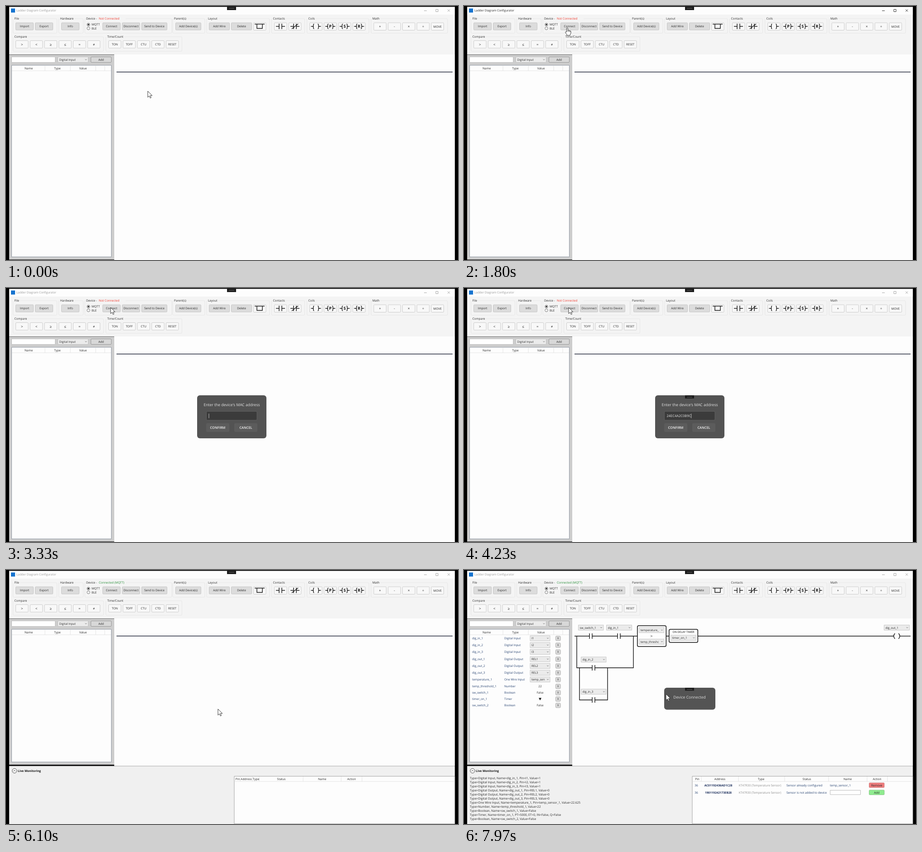
Recreate the animation shown at these times as an HTML page with a canvas. Size 998x561 px, loop 8000 ms.

```html
<!DOCTYPE html>
<html lang="en">
<head>
<meta charset="utf-8">
<title>Ladder Diagram Configurator</title>
<style>
html, body { margin: 0; width: 100%; height: 100%; overflow: hidden; background: #000; }
canvas { display: block; width: 998px; height: 561px; }
</style>
</head>
<body>
<canvas id="stage"></canvas>
<script>
const LOOP = 8000, W = 998, H = 561;
const canvas = document.getElementById('stage');
const ctx = canvas.getContext('2d');
const dpr = window.devicePixelRatio || 1;
canvas.width = W * dpr;
canvas.height = H * dpr;

const INK = '#262626', NAVY = '#24406f';
const T = { focus: 70, ble: 2330, mqtt: 2800, dialog: 3260, notch: 3400, type: 3430, hover: 5070,
            close: 5600, online: 6100, toast: 6130, data: 6630 };

// time, x, y of the pointer tip
const PATH = [
  [0, 313, 188], [30, 313, 188], [830, 229, 48], [1750, 229, 48], [2250, 194, 45], [2480, 194, 45],
  [2630, 198, 36], [2820, 193, 38], [3150, 231, 43], [4260, 231, 43], [5030, 468, 307],
  [6750, 468, 307], [7900, 446, 274], [8000, 446, 274]
];

function rect(x, y, w, h, fill, stroke, r = 0, lw = 1) {
  ctx.beginPath();
  ctx.roundRect(x, y, w, h, r);
  if (fill) { ctx.fillStyle = fill; ctx.fill(); }
  if (stroke) { ctx.strokeStyle = stroke; ctx.lineWidth = lw; ctx.stroke(); }
}

function line(points, color = '#111', lw = 1.4) {
  ctx.beginPath();
  for (let i = 0; i < points.length; i += 2) ctx.lineTo(points[i], points[i + 1]);
  ctx.strokeStyle = color;
  ctx.lineWidth = lw;
  ctx.stroke();
}

function text(s, x, y, { size = 6.5, color = INK, align = 'left', weight = 400 } = {}) {
  ctx.font = `${weight} ${size}px "Open Sans", "Noto Sans", sans-serif`;
  ctx.fillStyle = color;
  ctx.textAlign = align;
  ctx.textBaseline = 'alphabetic';
  ctx.fillText(s, x, y + size * 0.36);
}

const mid = (s, x, y, o = {}) => text(s, x, y, { ...o, align: 'center' });

function button(s, x, y, w, h, fill = '#dcdcdc', border = '#bdbdbd', size = 6.5) {
  rect(x + .5, y + .5, w - 1, h - 1, fill, border, 1.5, .8);
  mid(s, x + w / 2, y + h / 2, { size });
}

function combo(s, x, y, w, h = 12.5) {
  rect(x + .5, y + .5, w - 1, h - 1, '#ebebeb', '#bdbdbd', 0, .8);
  text(s, x + 3.5, y + h / 2, { size: 6.4 });
  const cx = x + w - 5.5, cy = y + h / 2;
  line([cx - 1.8, cy - 1, cx, cy + .8, cx + 1.8, cy - 1], '#555', .8);
}

function contact(x, y, half = 6) {
  line([x - 3, y - half, x - 3, y + half]);
  line([x + 3, y - half, x + 3, y + half]);
}

function group(s, x, y, w, h) {
  rect(x + .5, y + .5, w, h, null, '#e3e3e3', 2, .8);
  ctx.font = '6.5px "Open Sans", "Noto Sans", sans-serif';
  rect(x + 2, y - 2, ctx.measureText(s).width + 3, 5, '#f4f4f4');
  text(s, x + 3.5, y);
}

function coilIcon(x, y, letter) {
  line([x - 11, y, x - 6, y]);
  line([x + 6, y, x + 11, y]);
  for (const d of [-1, 1]) {
    line([x + d * 4, y - 5.5, x + d * 5.6, y - 4.5, x + d * 5.6, y - 1, x + d * 6.6, y,
          x + d * 5.6, y + 1, x + d * 5.6, y + 4.5, x + d * 4, y + 5.5], '#111', 1.3);
  }
  if (letter) mid(letter, x, y, { size: 9, weight: 700, color: '#111' });
}

function radio(x, y, on, hot) {
  ctx.beginPath();
  ctx.arc(x, y, 3.2, 0, 7);
  ctx.fillStyle = '#fff';
  ctx.fill();
  ctx.strokeStyle = hot ? '#4c93dc' : '#555';
  ctx.lineWidth = .8;
  ctx.stroke();
  if (!on) return;
  ctx.beginPath();
  ctx.arc(x, y, 1.7, 0, 7);
  ctx.fillStyle = '#111';
  ctx.fill();
}

function notch(y, h) {
  rect(488, y, 20, h, '#1d1d1d');
  rect(492, y + h / 2, 12, 1, '#666');
}

function titleBar(active) {
  const c = active ? '#222' : '#a0a0a0';
  rect(7, 2, 984, 17, '#fdfdfd');
  rect(11, 5.5, 9, 9, '#1673cf');
  text('Ladder Diagram Configurator', 23, 9.7, { size: 6.45, color: active ? INK : '#999' });
  line([923, 10.5, 929, 10.5], c, .9);
  rect(949, 7.5, 5, 5, null, c, 0, .9);
  line([975, 7.5, 980, 12.5], c, .9);
  line([980, 7.5, 975, 12.5], c, .9);
}

function ribbon(t) {
  rect(7, 19, 984, 88, '#f4f4f4');
  const online = t >= T.online, ble = t >= T.ble && t < T.mqtt;
  [['File', 15, 97], ['Hardware', 116, 54], ['Device -', 173.5, 192], ['Parent(s)', 367.5, 71],
   ['Layout', 442.5, 139], ['Contacts', 586, 73], ['Coils', 664, 137], ['Math', 805.5, 169]]
    .forEach(([s, x, w]) => group(s, x, 27.5, w, 32));
  group('Compare', 15, 67.5, 200, 32);
  group('Time/Count', 220, 67.5, 168, 32);
  rect(203, 25, 61, 6, '#f4f4f4');
  text(online ? 'Connected (MQTT)' : 'Not Connected', 205, 27.5, { color: online ? '#248c35' : '#f0382c' });

  [['Import', 21, 40], ['Export', 64, 40], ['Info', 122, 40], ['Connect', 213, 40], ['Disconnect', 256, 40],
   ['Send to Device', 299, 57], ['Add Device(s)', 374, 57], ['Add Wire', 448, 46], ['Delete', 497, 46]]
    .forEach(([s, x, w]) => button(s, x, 36.5, w, 17));

  radio(182, 41, !ble, t > 2580 && t < T.mqtt);
  radio(182, 49.3, ble);
  text('MQTT', 189, 41);
  text('BLE', 189, 49.5);

  const light = (s, x, y, size) => button(s, x, y, 28.5, 17.5, '#f8f8f8', '#c2c2c2', size);
  const row = (list, x, y, size) => list.forEach((s, i) => light(s, x + i * 31.75, y, size));
  row([''], 546, 36.5);
  row(['', ''], 592, 36.5);
  row(['', '', '', ''], 670, 36.5);
  row(['+', '-', '×', '÷'], 811.5, 36.5, 8);
  light('MOVE', 938.5, 36.5);
  row(['>', '<', '≥', '≤', '=', '≠'], 21, 76, 8);
  row(['TON', 'TOFF', 'CTU', 'CTD', 'RESET'], 226, 76);

  line([549, 40, 571, 40]);
  line([554, 40, 554, 49.5, 566, 49.5, 566, 40]);
  for (const x of [606, 638]) {
    contact(x, 45);
    line([x - 10, 45, x - 3, 45]);
    line([x + 3, 45, x + 10, 45]);
  }
  line([631, 50.5, 645, 39.5]);
  ['', 'P', 'S', 'R'].forEach((s, i) => coilIcon(684.3 + i * 31.75, 45, s));
}

function sidePanel(t) {
  const bottom = t >= T.online ? 424 : 554;
  rect(7, 107.5, 232, bottom - 101.5, '#cdcdcd');
  rect(12.5, 112.5, 96, 12, '#fff', '#bbb', 0, .8);
  combo('Digital Input', 114, 112, 68, 13);
  button('Add', 187, 112, 46, 13, '#d8d8d8', '#8a8a8a');
  rect(12.5, 131, 220, bottom - 131, '#fdfdfd', '#8b93a0', 0, .9);
  line([13, 143, 232, 143], '#dedede', .8);
  for (const x of [86, 142, 198, 218]) line([x, 132, x, 143], '#dedede', .8);
  mid('Name', 50, 137.5);
  mid('Type', 113.5, 137.5);
  mid('Value', 170, 137.5);
  if (t < T.data) return;

  [['dig_in_1', 'Digital Input', 'I1', 151], ['dig_in_2', 'Digital Input', 'I2', 166],
   ['dig_in_3', 'Digital Input', 'I3', 181], ['dig_out_1', 'Digital Output', 'REL1', 197],
   ['dig_out_2', 'Digital Output', 'REL2', 212], ['dig_out_3', 'Digital Output', 'REL3', 227],
   ['temperature_1', 'One Wire Input', 'temp_sen', 242], ['temp_threshold_1', 'Number', '22', 257],
   ['sw_switch_1', 'Boolean', 'False', 271], ['timer_on_1', 'Timer', '▼', 285],
   ['sw_switch_2', 'Boolean', 'False', 299]].forEach(([name, type, value, y], i) => {
    text(name, 18, y, { size: 6.4, color: NAVY });
    text(type, 89, y, { size: 6.4, color: NAVY });
    if (i < 7) combo(value, 145.5, y - 6.5, 45);
    else if (value === '▼') {
      ctx.beginPath();
      ctx.moveTo(165, y - 2.5);
      ctx.lineTo(171, y - 2.5);
      ctx.lineTo(168, y + 3);
      ctx.fillStyle = '#111';
      ctx.fill();
    } else mid(value, 168, y, { size: 6.4 });
    button('X', 202, y - 5.5, 11.5, 11, '#dedede', '#999');
  });
}

function block(x, y, w, h) {
  rect(x, y, w, h, '#fdfdfd', '#111', 3, 1.5);
}

function ladder(t) {
  rect(239, 107, 752, 454, '#fdfdfd');
  if (t < T.data) return line([244, 145.8, 986, 145.8], '#252b3c', 1.5);

  const y = 146;
  for (const [a, b] of [[244, 277], [283, 339], [345, 948], [963, 986]]) line([a, y, b, y]);
  contact(280, y);
  contact(342, y);
  line([249, y, 249, 216, 283, 216]);
  line([289, 216, 374, 216, 374, y]);
  contact(286, 216);
  line([255, 216, 255, 287, 283, 287]);
  line([289, 287, 317, 287, 317, 216]);
  contact(286, 287);

  combo('sw_switch_1', 252, 121, 56.5);
  combo('dig_in_1', 314, 121, 57);
  combo('dig_in_2', 258, 191.5, 56.5);
  combo('dig_in_3', 258, 262.5, 56.5);
  combo('dig_out_1', 927, 121, 57);

  block(382.8, 123, 63.5, 46);
  combo('temperature_', 386, 126.5, 56.5);
  mid('>', 414, 146, { size: 8.5 });
  combo('temp_threshc', 386, 152, 56.5);
  block(452.8, 131, 63.5, 29);
  mid('ON DELAY TIMER', 484.5, 137.3, { size: 6.1, color: '#111' });
  combo('timer_on_1', 456, 143.5, 57);

  ctx.lineWidth = 1.4;
  ctx.strokeStyle = '#111';
  for (const [x, c] of [[951.5, 946], [959.5, 965]]) {
    ctx.beginPath();
    ctx.moveTo(x, 140);
    ctx.quadraticCurveTo(c, 146, x, 152);
    ctx.stroke();
  }
}

function monitor(t) {
  if (t < T.online) return;
  const full = t >= T.data;
  rect(7, 433, 984, 128, '#f0f0f0');
  line([7, 433, 991, 433], '#a8a8a8', 1);
  ctx.beginPath();
  ctx.arc(18.8, 443.5, 5, 0, 7);
  ctx.fillStyle = '#fff';
  ctx.fill();
  ctx.strokeStyle = '#333';
  ctx.lineWidth = .9;
  ctx.stroke();
  line([16.5, 444.6, 18.8, 442.3, 21.1, 444.6], '#222', 1);
  text('Live Monitoring', 26, 443.7, { weight: 700, color: '#111' });

  rect(504, 455.5, 487, 105, '#fdfdfd', '#9a9a9a', 0, .9);
  line([504, 467, 991, 467], '#dcdcdc', .8);
  const seps = full ? [524, 606, 708, 805, 890, 935] : [517, 544, 559, 656, 740, 786];
  for (const x of seps) line([x, 456, x, 467], '#dcdcdc', .8);
  const heads = full
    ? [['Pin', 515], ['Address', 565], ['Type', 656], ['Status', 757], ['Name', 847], ['Action', 912]]
    : [['Pin', 511.5], ['Address', 530.5], ['Type', 552], ['Status', 608], ['Name', 698], ['Action', 763]];
  for (const [s, x] of heads) mid(s, x, 461.5);
  if (!full) return;

  ['Digital Input, Name=dig_in_1, Pin=I1, Value=1', 'Digital Input, Name=dig_in_2, Pin=I2, Value=1',
   'Digital Input, Name=dig_in_3, Pin=I3, Value=1', 'Digital Output, Name=dig_out_1, Pin=REL1, Value=0',
   'Digital Output, Name=dig_out_2, Pin=REL2, Value=0', 'Digital Output, Name=dig_out_3, Pin=REL3, Value=0',
   'One Wire Input, Name=temperature_1, Pin=temp_sensor_1, Value=22.625',
   'Number, Name=temp_threshold_1, Value=22', 'Boolean, Name=sw_switch_1, Value=False',
   'Timer, Name=timer_on_1, PT=5000, ET=0, IN=False, Q=False', 'Boolean, Name=sw_switch_2, Value=False']
    .forEach((s, i) => text('Type=' + s, 13, 460 + i * 9, { size: 6.6 }));

  [['AC01192436AD1C28', 'Sensor already configured', 475.5], ['190119242173EB28', 'Sensor is not added to device', 491.5]]
    .forEach(([id, status, y]) => {
      mid('36', 513, y, { color: NAVY });
      mid(id, 561.5, y, { weight: 700, color: '#1c2f5c', size: 6.4 });
      mid('KT47R30 (Temperature Sensor)', 653.5, y, { color: '#8c8c8c' });
      text(status, 712, y, { color: NAVY });
    });
  text('temp_sensor_1', 808, 475.5, { color: NAVY });
  rect(808.5, 486.5, 67, 9.5, '#fff', '#aaa', 0, .8);
  button('Remove', 894, 469.5, 34.5, 11.5, '#ee7c7c', '#c98080');
  button('Add', 894, 485.5, 34.5, 11.5, '#8fec8f', '#86bd86');
}

function dialog(t) {
  if (t < T.dialog || t >= T.close) return;
  const mac = '24EC4A2C0B9C';
  const typed = mac.slice(0, Math.max(0, Math.floor((t - T.type) / 60)));
  rect(422, 237, 153, 95, '#535353', null, 6);
  if (t >= T.notch) notch(237, 7);
  mid("Enter the device's MAC address", 498.5, 258, { size: 8.57, color: '#e2e2e2' });
  rect(442.5, 272.5, 111.5, 19.5, '#3b3b3b', '#686868', 2, .8);
  text(typed, 447.5, 282.3, { size: 7.5, color: '#e6e6e6' });
  if (t < 4700) {
    const x = 448 + ctx.measureText(typed).width;
    line([x, 277.5, x, 287.5], '#ddd', .8);
  }
  rect(442, 298.5, 51, 19.5, t >= T.hover ? '#777' : '#5c5c5c', null, 3);
  rect(504, 298.5, 51, 19.5, '#5c5c5c', null, 3);
  mid('CONFIRM', 467.5, 308.3, { size: 7.4, weight: 600, color: '#f4f4f4' });
  mid('CANCEL', 529.5, 308.3, { size: 7.4, weight: 600, color: '#f4f4f4' });
}

function toast(t) {
  if (t < T.toast) return;
  ctx.globalAlpha = Math.min(1, (t - T.toast + 35) / 100);
  rect(442, 260, 113, 48.5, '#545454', null, 6);
  notch(260, 6.5);
  mid('Device Connected', 498, 280.5, { size: 8.6, color: '#dedede' });
  ctx.globalAlpha = 1;
}

const ARROW = new Path2D('M0 0V13.6L3.2 10.7L5.4 15.4L7.5 14.5L5.4 9.9H9.8Z');
const HAND = new Path2D('M-1.5 1Q0-1 1.3 1V6Q3 5 3.9 6.4Q5.4 5.7 6.2 7Q8 6.7 8 8.5V12L6.3 15.5V17H-.8V15.4L-4.3 10.5Q-4.4 8-1.5 9.7Z');

function cursor(t) {
  const i = PATH.findIndex((p, k) => k && t <= p[0]);
  const [t0, x0, y0] = PATH[i - 1], [t1, x1, y1] = PATH[i];
  const u = (t - t0) / (t1 - t0), k = u * u * (3 - 2 * u);
  const hand = (t > 750 && t < 1850) || (t > 3020 && t < T.dialog);
  ctx.save();
  ctx.translate(x0 + (x1 - x0) * k, y0 + (y1 - y0) * k);
  ctx.fillStyle = '#fff';
  ctx.strokeStyle = '#222';
  ctx.lineWidth = .9;
  const shape = hand ? HAND : ARROW;
  ctx.fill(shape);
  ctx.stroke(shape);
  if (hand) {
    line([1.3, 6, 1.3, 9], '#222', .8);
    line([3.9, 6.5, 3.9, 9.3], '#222', .8);
    line([6.2, 7.2, 6.2, 9.5], '#222', .8);
  }
  ctx.restore();
}

function draw(t) {
  ctx.setTransform(dpr, 0, 0, dpr, 0, 0);
  ctx.textRendering = 'geometricPrecision';
  rect(0, 0, W, H, '#000');
  rect(7, 0, 984, 2, '#1c1c1c');
  titleBar((t >= T.focus && t < T.dialog) || (t >= T.close && t < T.online));
  ribbon(t);
  ladder(t);
  sidePanel(t);
  monitor(t);
  notch(0, 9);
  dialog(t);
  toast(t);
  cursor(t);
}

const start = performance.now();
function tick() {
  draw((performance.now() - start) % LOOP);
  requestAnimationFrame(tick);
}
tick();
</script>
</body>
</html>
```
